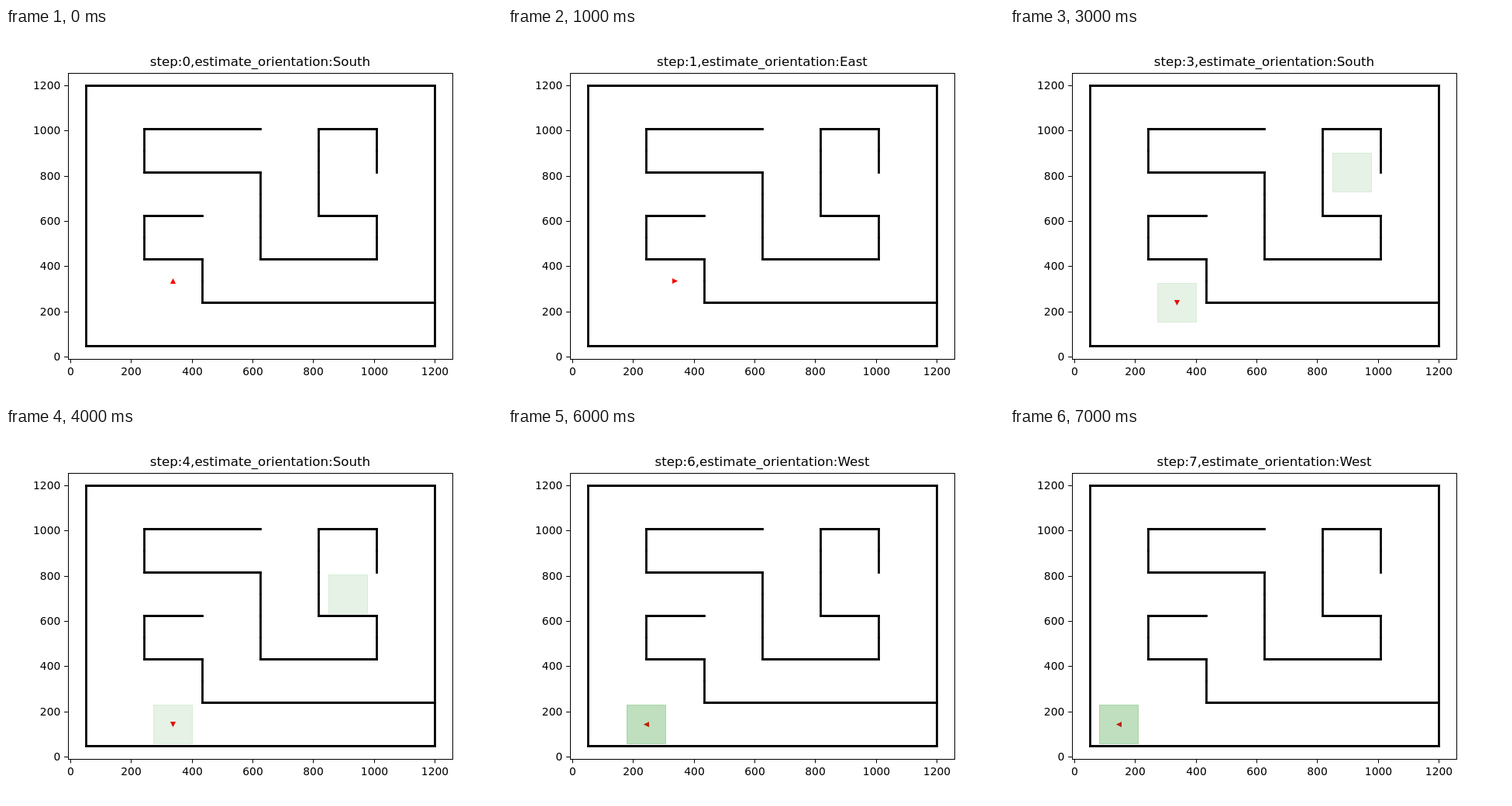
An HTML page for the animation above (8 s loop, 640 px wide and 480 px high).

```html
<!DOCTYPE html>
<html lang="en">
<head>
<meta charset="utf-8">
<title>Maze localization</title>
<style>
html, body { margin: 0; width: 100%; height: 100%; overflow: hidden; background: #fff; }
svg { display: block; }
text { font-family: "DejaVu Sans", sans-serif; font-size: 13.89px; }
#title { font-size: 16.67px; text-anchor: middle; }
.axis { fill: none; stroke: #000; stroke-width: 1; }
.wall { fill: none; stroke: #000; stroke-width: 2.78; stroke-linecap: square; }
.guess { fill: #008000; stroke: #008000; stroke-width: 1; }
</style>
</head>
<body>
<svg width="640" height="480" viewBox="0 0 640 480">
  <g id="plot"></g>
  <path id="robot" d="M0 -3.6L3.6 3.5H-3.6Z" fill="#f00"/>
  <g id="guesses"></g>
  <rect class="axis" x="80.5" y="58.5" width="496" height="369"/>
  <text id="title" x="328" y="49"></text>
</svg>
<script>
const STEP_MS = 1000;
const ANGLE = { North: 0, East: 90, South: 180, West: 270 };

// Each step: robot cell, heading, estimated heading, candidate cells, opacity
const steps = [
  { at: [3, 9], heading: 'North', estimate: 'South' },
  { at: [3, 9], heading: 'East', estimate: 'East' },
  { at: [3, 9], heading: 'South', guesses: [[3, 9], [9, 3]], alpha: 0.1 },
  { at: [3, 10], heading: 'South', guesses: [[3, 10], [9, 4]], alpha: 0.1 },
  { at: [3, 11], heading: 'South', guesses: [[3, 11], [9, 5]], alpha: 0.1 },
  { at: [3, 11], heading: 'West', guesses: [[3, 11]], alpha: 0.25 },
  { at: [2, 11], heading: 'West', guesses: [[2, 11]], alpha: 0.25 },
  { at: [1, 11], heading: 'West', guesses: [[1, 11]], alpha: 0.25 }
];

const innerWalls = [
  [[6, 2], [2, 2], [2, 4], [6, 4], [6, 8], [10, 8], [10, 6], [8, 6], [8, 2], [10, 2], [10, 4]],
  [[4, 6], [2, 6], [2, 8], [4, 8], [4, 10], [12, 10]]
];

const $ = id => document.getElementById(id);
const snap = v => Math.floor(v) + 0.5;
const cellX = c => snap(103.3 + 37.53 * c);
const cellY = r => 74.5 + 28 * r;

function add(parent, tag, attrs, content) {
  const el = document.createElementNS('http://www.w3.org/2000/svg', tag);
  for (const key in attrs) el.setAttribute(key, attrs[key]);
  if (content !== undefined) el.textContent = content;
  parent.appendChild(el);
  return el;
}

function wall([c1, r1], [c2, r2]) {
  add($('plot'), 'path', {
    class: 'wall',
    d: `M${cellX(c1)} ${cellY(r1)}L${cellX(c2)} ${cellY(r2)}`
  });
}

function drawAxes() {
  for (let k = 0; k <= 6; k++) {
    const x = snap(83.7 + 78.26 * k), y = snap(424.5 - 58.35 * k);
    add($('plot'), 'path', { class: 'axis', d: `M${x} 428v4.4M${80} ${y}h-4.9` });
    add($('plot'), 'text', { x, y: 448, 'text-anchor': 'middle' }, k * 200);
    add($('plot'), 'text', { x: 70.3, y: y + 4.5, 'text-anchor': 'end' }, k * 200);
  }
}

function drawWalls() {
  const corners = [[0, 0], [12, 0], [12, 12], [0, 12]];
  corners.forEach((p, i) => wall(p, corners[(i + 1) % 4]));
  // Inner walls are built one cell side at a time
  for (const line of innerWalls) {
    for (let i = 1; i < line.length; i++) {
      let [c, r] = line[i - 1];
      const [c2, r2] = line[i];
      const dc = Math.sign(c2 - c), dr = Math.sign(r2 - r);
      while (c !== c2 || r !== r2) {
        wall([c, r], [c + dc, r + dr]);
        c += dc;
        r += dr;
      }
    }
  }
}

function show(n) {
  const { at, heading, estimate = heading, guesses = [], alpha } = steps[n];
  $('title').textContent = `step:${n},estimate_orientation:${estimate}`;
  $('robot').setAttribute('transform',
    `translate(${cellX(at[0])} ${cellY(at[1])}) rotate(${ANGLE[heading]})`);
  $('guesses').replaceChildren();
  for (const [c, r] of guesses) {
    add($('guesses'), 'rect', {
      class: 'guess', x: cellX(c) - 25, y: cellY(r) - 25, width: 50, height: 50,
      'fill-opacity': alpha, 'stroke-opacity': alpha
    });
  }
}

drawAxes();
drawWalls();
show(0);

const start = performance.now();
let current = 0;
function tick() {
  const n = Math.floor((performance.now() - start) / STEP_MS) % steps.length;
  if (n !== current) show(current = n);
  requestAnimationFrame(tick);
}
requestAnimationFrame(tick);
</script>
</body>
</html>
```
